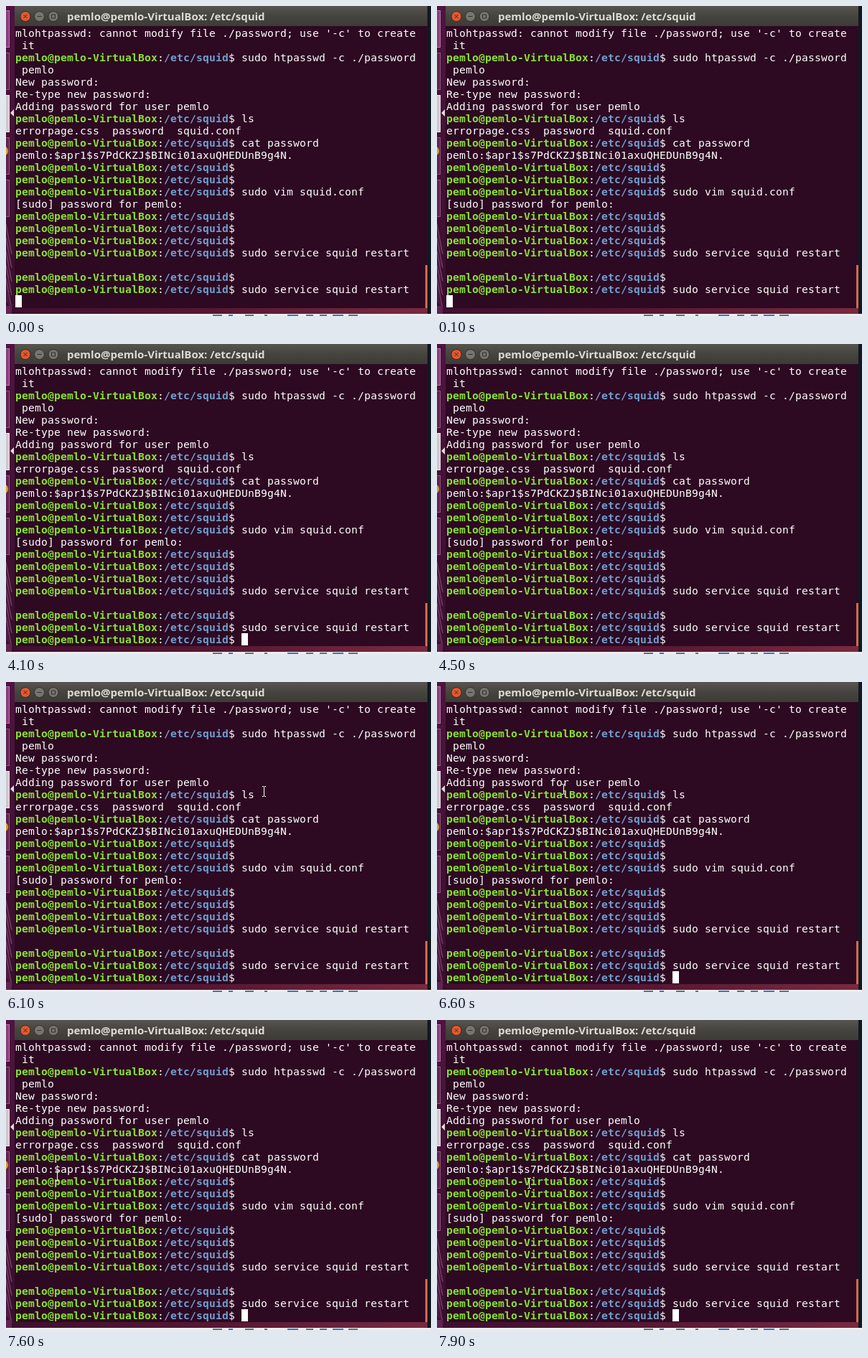
Write an HTML page with a canvas that moves like this. It is 592 by 432 pixels and loops after 8 s.

```html
<!DOCTYPE html>
<html lang="en">
<head>
<meta charset="utf-8">
<title>Terminal</title>
<style>
  html, body { margin: 0; width: 100%; height: 100%; overflow: hidden; background: #2d0922; }
  canvas { display: block; }
</style>
</head>
<body>
<canvas id="stage" width="592" height="432"></canvas>
<script>
const ctx = document.getElementById('stage').getContext('2d');
const LOOP = 8000, STEP = 100, COL = 9, ROW = 17, LEFT = 13, TOP = 29;
const MONO = '11pt "DejaVu Sans Mono", monospace';
const USER = 'pemlo', HOST = USER + '@' + USER + '-VirtualBox', DIR = '/etc/squid';
const RESTART = '$ sudo service squid restart';

// Lines that start with "$" get the coloured prompt.
const lines = [
  USER.slice(2) + "htpasswd: cannot modify file ./password; use '-c' to create",
  ' it',
  '$ sudo htpasswd -c ./password',
  ' ' + USER,
  'New password:',
  'Re-type new password:',
  'Adding password for user ' + USER,
  '$ ls',
  'errorpage.css  password  squid.conf',
  '$ cat password',
  USER + ':$apr1$s7PdCKZJ$BINci01axuQHEDUnB9g4N.',
  '$', '$',
  '$ sudo vim squid.conf',
  '[sudo] password for ' + USER + ':',
  '$', '$', '$',
  RESTART, '', '$', RESTART
];

// The terminal rounds each cell up to whole pixels.
ctx.font = MONO;
const CELL_GAP = COL - ctx.measureText('0').width + 'px';

function box(color, x, y, w, h) {
  ctx.fillStyle = color;
  ctx.fillRect(x, y, w, h);
}

function disc(color, x, y, r) {
  ctx.fillStyle = color;
  ctx.beginPath();
  ctx.arc(x, y, r, 0, 7);
  ctx.fill();
}

function shape(color, ...points) {
  ctx.fillStyle = color;
  ctx.beginPath();
  points.forEach(([x, y]) => ctx.lineTo(x, y));
  ctx.fill();
}

function gradient(x1, y1, ...colors) {
  const g = ctx.createLinearGradient(0, 0, x1, y1);
  colors.forEach((c, i) => g.addColorStop(i / (colors.length - 1), c));
  return g;
}

function write(text, col, row, color = '#fff', bold = false) {
  ctx.font = (bold ? 'bold ' : '') + MONO;
  ctx.letterSpacing = CELL_GAP;
  ctx.fillStyle = color;
  ctx.fillText(text, LEFT + col * COL, TOP + 14 + row * ROW);
}

function writeLine(text, row) {
  if (text[0] !== '$') return write(text, 0, row);
  write(HOST, 0, row, '#8ae234', true);
  write(':', HOST.length, row);
  write(DIR, HOST.length + 1, row, '#729fcf', true);
  write(text, HOST.length + 1 + DIR.length, row);
}

function drawLauncher() {
  box(gradient(0, 432, '#4f1440', '#451136', '#3b0d2e'), 0, 0, 12, 432);
  for (let i = 0; i < 5; i++) {
    const y = 6 + i * 59;
    const [fill, edge] = i === 0 ? ['#8a3f7d', '#b57bab']
      : i === 2 ? ['#d0c8cd', '#f2eef0'] : ['#5f2450', '#8d5a80'];
    box(edge, 0, y, 5, 52);
    box(fill, 0, y + 1, 4, 50);
  }
  disc('#d9a02b', -4, 202, 7);
  shape('#ddd', [6, 149], [11, 144], [11, 154]);
  for (let i = 0; i < 5; i++) {
    const y = 304 + i * 19;
    shape('#4d1b41', [0, y], [4, y + 22], [8, y + 42], [0, y + 32]);
    ctx.strokeStyle = '#7d4a70';
    ctx.beginPath();
    ctx.moveTo(0, y);
    ctx.lineTo(8, y + 42);
    ctx.stroke();
  }
  box('#5f2450', 0, 418, 8, 11);
}

function drawWindow() {
  box('#2d0922', 12, 28, 575, 393);
  box(gradient(0, 28, '#565550', '#45443f', '#3c3b37'), 12, 0, 575, 28);
  ['#e8572c', '#77756c', '#77756c'].forEach((color, i) => {
    const x = 27 + i * 19.5;
    disc(color, x, 14.5, 7);
    ctx.strokeStyle = '#302f2b';
    ctx.stroke();
    ctx.beginPath();
    if (i === 0) {
      ctx.moveTo(x - 2.5, 12); ctx.lineTo(x + 2.5, 17);
      ctx.moveTo(x + 2.5, 12); ctx.lineTo(x - 2.5, 17);
    } else if (i === 1) {
      ctx.moveTo(x - 3, 14.5); ctx.lineTo(x + 3, 14.5);
    } else {
      ctx.rect(x - 2.5, 12, 5, 5);
    }
    ctx.stroke();
  });
  ctx.font = '600 15px "Noto Sans", sans-serif';
  ctx.letterSpacing = '0px';
  ctx.fillStyle = '#dfdbd2';
  ctx.fillText(HOST + ': ' + DIR, 85, 20);
  box('#d5694c', 584, 361, 3, 60);
}

function drawEdges() {
  box('#101820', 587, 0, 5, 429);
  box(gradient(592, 0, '#3f0f2f', '#571733', '#7a2a40'), 12, 421, 575, 8);
  box('#eeeeee', 0, 429, 592, 3);
  [[288, 13], [310, 6], [333, 12], [360, 4], [392, 15], [418, 10], [437, 10], [455, 15], [477, 13]]
    .forEach(([x, w], i) => box(i % 3 === 1 ? '#4977ad' : '#657382', x, 430, w, 2));
}

function drawPointer(x, y) {
  box('#fff', x, y - 6, 1, 13);
  for (const end of [-7, 7]) {
    box('#fff', x - 2, y + end, 2, 1);
    box('#fff', x + 1, y + end, 2, 1);
  }
}

// Moves along a quadratic curve between two times; null outside them.
function along(t, start, end, a, b, c) {
  if (t < start || t > end) return null;
  const u = (t - start) / (end - start), v = 1 - u;
  return [0, 1].map(i => Math.round(v * v * a[i] + 2 * u * v * b[i] + u * u * c[i]));
}

function draw(now) {
  const t = Math.floor(now % LOOP / STEP) * STEP;
  const done = t >= 3800;
  drawLauncher();
  drawWindow();
  drawEdges();
  lines.forEach(writeLine);
  if (done) writeLine('$', lines.length);

  const blinkOn = !done || Math.floor((t - 3800) / 600) % 2 === 0;
  if (blinkOn) box('#fff', LEFT + (done ? 35 : 0) * COL, TOP + lines.length * ROW, COL, ROW);

  const pointer = along(t, 6100, 7000, [359, 152], [190, 125], [36, 184])
    || along(t, 7300, 7900, [36, 192], [60, 225], [128, 227]);
  if (pointer) drawPointer(...pointer);
  requestAnimationFrame(() => draw(performance.now() - begin));
}

const begin = performance.now();
draw(0);
</script>
</body>
</html>
```
